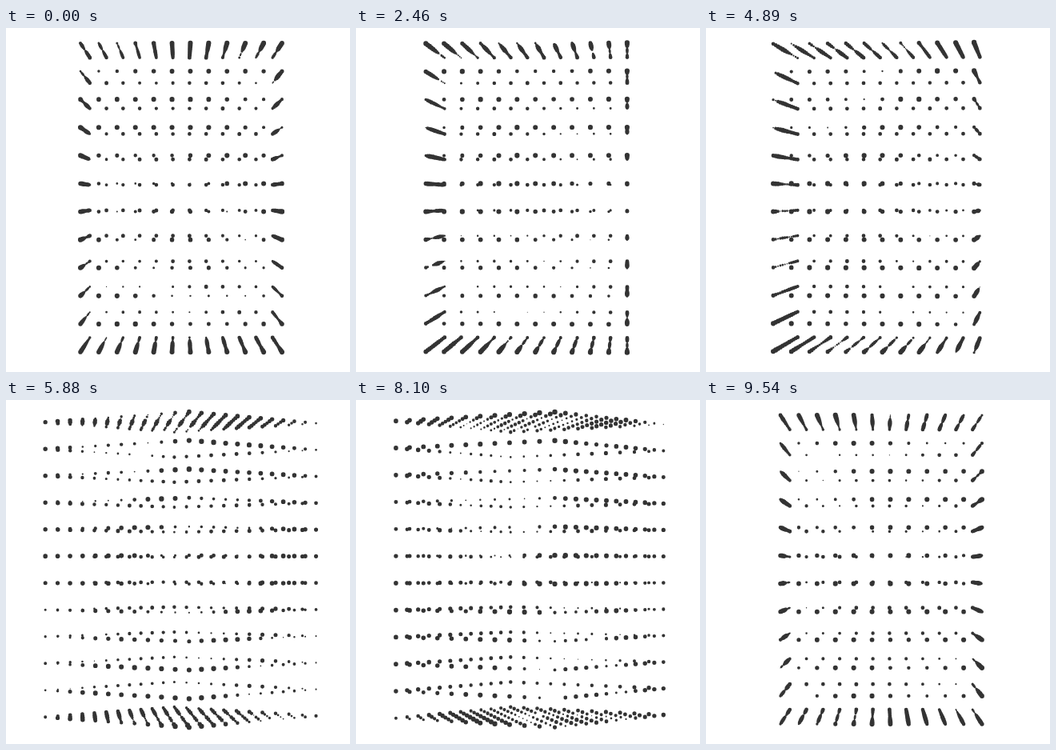
Recreate the animation shown at these times as an HTML page. Size 430 px wide and 430 px high, loop 9570 ms.

```html
<!DOCTYPE html>
<html lang="en">
<head>
<meta charset="utf-8">
<title>Rotating dot box</title>
<style>
  html, body { margin: 0; width: 100%; height: 100%; overflow: hidden; background: #fff; }
  svg { display: block; width: 430px; height: 430px; }
</style>
</head>
<body>
<svg viewBox="0 0 430 430"><path id="dots" fill="#333"/></svg>
<script>
const LOOP = 9570, STEP = 30, TURN = LOOP - STEP;
const COUNT = 12, LAST = COUNT - 1;
const CENTER = { x: 219, y: 212 };
const HALF = { side: 119.8, height: 183.6 };
const CAMERA = HALF.side / 0.049;
const RADIUS = 2.75, NEARER = 0.35, MIN_RADIUS = 0.5;

const path = document.getElementById('dots');
const spread = (index, half) => (index / LAST * 2 - 1) * half;
const onEdge = index => index === 0 || index === LAST;

// Only the shell of the box carries dots
const shell = [];
for (let i = 0; i < COUNT; i++)
  for (let j = 0; j < COUNT; j++)
    for (let k = 0; k < COUNT; k++)
      if (onEdge(i) || onEdge(j) || onEdge(k))
        shell.push({
          i, j, k,
          x: spread(i, HALF.side),
          y: spread(j, HALF.height),
          z: spread(k, HALF.side)
        });

// Smooth drifting field: nearly full size everywhere, with narrow dips to nothing
function swell({ i, j, k }, seconds) {
  const phase = 1.5
    + 0.8 * Math.sin(0.42 * i + 0.22 * k + 0.9 * seconds)
    + 0.9 * Math.sin(0.62 * j - 0.25 * i - 1.1 * seconds + 2)
    + 0.7 * Math.sin(0.38 * k + 0.36 * j + 0.7 * seconds + 4);
  return Math.abs(Math.sin(phase)) ** 0.4;
}

function circle(x, y, r) {
  const d = (2 * r).toFixed(2), radius = r.toFixed(2);
  return `M${(x - r).toFixed(2)} ${y.toFixed(2)}` +
    `a${radius} ${radius} 0 1 1 ${d} 0a${radius} ${radius} 0 1 1 -${d} 0z`;
}

function draw(time) {
  const angle = time / TURN * 2 * Math.PI;
  const cos = Math.cos(angle), sin = Math.sin(angle);
  let shape = '';
  for (const dot of shell) {
    const x = dot.x * cos - dot.z * sin;
    const z = dot.x * sin + dot.z * cos;
    const scale = CAMERA / (CAMERA - z);
    const radius = (RADIUS + NEARER * z / HALF.side) * swell(dot, time / 1000);
    if (radius > MIN_RADIUS)
      shape += circle(CENTER.x + x * scale, CENTER.y + dot.y * scale, radius);
  }
  path.setAttribute('d', shape);
}

const start = performance.now();
function tick() {
  const elapsed = (performance.now() - start) % LOOP;
  draw(Math.floor(elapsed / STEP) * STEP);
  requestAnimationFrame(tick);
}
tick();
</script>
</body>
</html>
```
